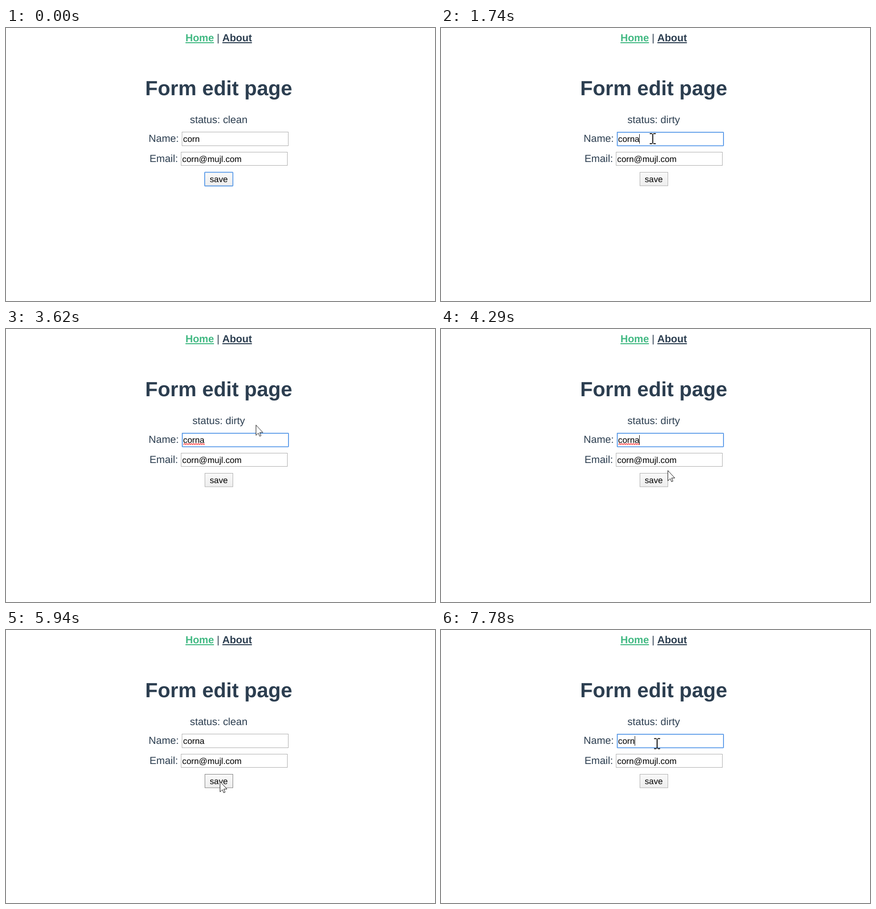
Recreate the animation shown at these times as an HTML page. Size 937 px wide and 597 px high, loop 8000 ms.

```html
<!DOCTYPE html>
<html lang="en">
<head>
<meta charset="utf-8">
<title>Form edit page</title>
<style>
html, body { margin: 0; width: 100%; height: 100%; overflow: hidden; background: #fff; }
svg { display: block; width: 937px; height: 597px; }
text {
  font: 22.4px "Liberation Sans", Arial, sans-serif;
  fill: #2c3e50;
  text-rendering: geometricPrecision;
  white-space: pre;
}
.mid { text-anchor: middle; }
.link { font-weight: bold; text-decoration: underline; }
.active { fill: #42b983; }
.title { font-size: 44.8px; font-weight: bold; }
.field { font-size: 18.667px; fill: #000; }
.box { fill: #fff; stroke: #a9a9a9; }
.ring { fill: none; stroke: #5e9de9; stroke-width: 2; }

/* One loop is 8 s, so 1% is 80 ms; every change is a hard step. */
.anim { animation: 8s step-end infinite; }
#clean { animation-name: clean; }
#dirty { animation-name: dirty; }
#extra { animation-name: extra; }
#caret { animation-name: caret, caret-x; animation-duration: 8s; }
#wave { animation-name: wave; }
#nameRing { animation-name: name-ring; }
#saveRing { animation-name: save-ring; }
#save { animation-name: save; }
#pointer { animation-name: move; }
#arrow { animation-name: arrow; }
#beam { animation-name: beam; }
#click { animation-name: click; }

@keyframes clean {
  0%, 68.75% { visibility: visible; }
  21.75%, 91.875% { visibility: hidden; }
}
@keyframes dirty {
  0%, 68.75% { visibility: hidden; }
  21.75%, 91.875% { visibility: visible; }
}
@keyframes extra {
  0%, 91.875% { visibility: hidden; }
  21.75% { visibility: visible; }
}
@keyframes caret {
  0%, 28.75%, 42.375%, 56.125%, 67.25%, 90.625% { visibility: hidden; }
  16.25%, 35.5%, 49.125%, 61.875%, 83.75%, 97.25% { visibility: visible; }
}
@keyframes caret-x {
  0%, 91.875% { transform: translate(0, 0); }
  21.75% { transform: translate(10px, 0); }
}
@keyframes wave {
  0%, 67.25% { visibility: hidden; }
  37% { visibility: visible; }
}
@keyframes name-ring {
  0%, 67.25% { visibility: hidden; }
  16.25%, 83.75% { visibility: visible; }
}
@keyframes save-ring {
  0% { visibility: visible; }
  16.25% { visibility: hidden; }
}
@keyframes save {
  0%, 75.575% { stroke: #a9a9a9; fill: url(#face); }
  54.625%, 68.75% { stroke: #777; fill: url(#face); }
  67.25% { stroke: #777; fill: #e7e7e7; }
}
@keyframes arrow {
  0%, 10.86%, 47.875%, 50.5%, 76.9%, 79.55% { visibility: hidden; }
  2.5%, 28.75%, 49.125%, 53.25%, 78.225% { visibility: visible; }
}
@keyframes beam {
  0%, 28.75%, 49.125%, 53.25%, 78.225% { visibility: hidden; }
  10.86%, 47.875%, 50.5%, 76.9%, 79.55% { visibility: visible; }
}
@keyframes click {
  0%, 19%, 68.75%, 85% { visibility: hidden; }
  16.25%, 67.25%, 83.75% { visibility: visible; }
}
@keyframes move {
  /* into the name field */
  0% { transform: translate(356px, 13px); }
  3.89% { transform: translate(368px, 36px); }
  5.28% { transform: translate(386px, 78px); }
  6.68% { transform: translate(407px, 128px); }
  8.07% { transform: translate(427px, 173px); }
  9.46% { transform: translate(443px, 208px); }
  10.86% { transform: translate(455px, 236px); }
  12.25% { transform: translate(461px, 242px); }
  13.625% { transform: translate(462.5px, 242px); }
  /* up to the status line */
  27.375% { transform: translate(468px, 237px); }
  28.75% { transform: translate(490px, 219px); }
  30.125% { transform: translate(507px, 205px); }
  31.5% { transform: translate(519px, 194px); }
  32.75% { transform: translate(525px, 189.5px); }
  /* round and back down */
  38.25% { transform: translate(528px, 180px); }
  39.625% { transform: translate(533px, 173.5px); }
  41% { transform: translate(539px, 176px); }
  42.375% { transform: translate(543px, 186px); }
  43.75% { transform: translate(545px, 198px); }
  45.25% { transform: translate(545.5px, 209.5px); }
  46.625% { transform: translate(543px, 224px); }
  47.875% { transform: translate(538px, 245px); }
  /* onto the button */
  49.125% { transform: translate(528px, 262px); }
  50.5% { transform: translate(519px, 280px); }
  51.875% { transform: translate(507px, 296px); }
  53.25% { transform: translate(495px, 309px); }
  54.625% { transform: translate(484px, 320px); }
  56.125% { transform: translate(475px, 330px); }
  57.5% { transform: translate(469px, 336px); }
  58.875% { transform: translate(467.5px, 338.5px); }
  /* back to the name field */
  74.25% { transform: translate(467px, 331px); }
  75.575% { transform: translate(468px, 311px); }
  76.9% { transform: translate(469px, 290px); }
  78.225% { transform: translate(470px, 268px); }
  79.55% { transform: translate(471px, 254px); }
  80.875% { transform: translate(472px, 248.5px); }
}
</style>
</head>
<body>
<svg viewBox="0 0 937 597">
  <defs>
    <linearGradient id="face" x2="0" y2="1">
      <stop offset="0" stop-color="#f9f9f9"/>
      <stop offset="1" stop-color="#eeeeee"/>
    </linearGradient>
    <pattern id="ripple" x="387.5" y="249.5" width="5" height="4.5" patternUnits="userSpaceOnUse">
      <path d="M-1.25 2.2 L0 3.3 L2.5 1.1 L5 3.3 L6.25 2.2" fill="none" stroke="#f00" stroke-width="1.2"/>
    </pattern>
  </defs>

  <text class="mid" x="464.6" y="29"><tspan class="link active">Home</tspan> | <tspan class="link">About</tspan></text>
  <text class="mid title" x="464.6" y="147">Form edit page</text>
  <text id="clean" class="mid anim" x="464.6" y="208">status: clean</text>
  <text id="dirty" class="mid anim" x="464.6" y="208">status: dirty</text>

  <text x="311.6" y="249">Name:</text>
  <rect class="box" x="384.5" y="227.5" width="232" height="30"/>
  <rect id="nameRing" class="ring anim" x="385" y="228" width="232" height="29.5" rx="1"/>
  <text class="field" x="386.8" y="249">corn<tspan id="extra" class="anim">a</tspan></text>
  <rect id="wave" class="anim" x="387.5" y="249.5" width="46.5" height="4.5" fill="url(#ripple)"/>
  <rect id="caret" class="anim" x="423" y="232" width="1" height="21"/>

  <text x="313.4" y="293">Email:</text>
  <rect class="box" x="382.5" y="271.5" width="232" height="29"/>
  <text class="field" x="384.8" y="293">corn@mujl.com</text>

  <rect id="save" class="anim" x="434.5" y="315.5" width="61" height="29.5"/>
  <rect id="saveRing" class="ring anim" x="434" y="315.5" width="61.5" height="30" rx="1"/>
  <text class="mid field" x="464.7" y="336.7">save</text>

  <g id="pointer" class="anim">
    <path id="arrow" class="anim" d="M.5 .5V23L5.6 18.2L8.7 25L11.6 23.7L8.7 16.9H15.6Z" fill="#fff" stroke="#000"/>
    <path id="beam" class="anim" d="M-6.5 -11H-1.5M1.5 -11H6.5M0 -10.5V10.5M-6.5 11H-1.5M1.5 11H6.5" fill="none" stroke="#000" stroke-width="2"/>
    <circle id="click" class="anim" cx="-2" cy="-1" r="16.7" fill="#ff0" fill-opacity=".55"/>
  </g>
</svg>
</body>
</html>
```
